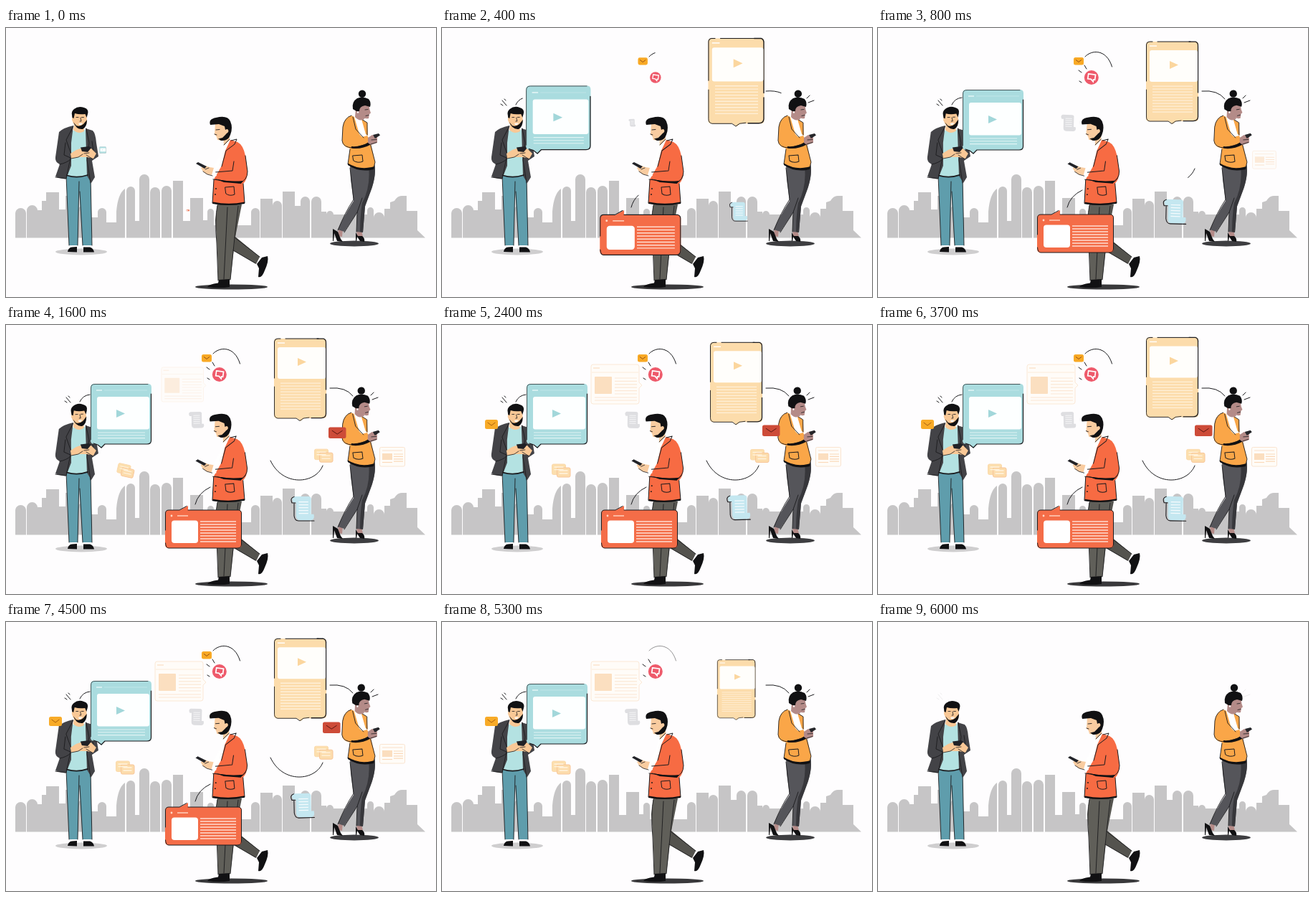
An HTML page for the animation above (6.1 s loop, 600 by 375 pixels).

```html
<!DOCTYPE html>
<html lang="en">
<head>
<meta charset="utf-8">
<title>Sharing on phones</title>
<style>
html, body { margin: 0; width: 100%; height: 100%; overflow: hidden; background: #fefdfe; }
svg { display: block; width: 100vw; height: 100vh; }
.ink { fill: none; stroke: #1b1b1e; stroke-linecap: round; stroke-linejoin: round; }
</style>
</head>
<body>
<svg id="stage" viewBox="0 0 600 375" xmlns="http://www.w3.org/2000/svg"></svg>
<script>
const LOOP = 6100, STEP = 100, INK = '#111113';
const stage = document.getElementById('stage');

const path = (d, fill, stroke = 'none') => `<path d="${d}" fill="${fill}" stroke="${stroke}"/>`;
const ink = (d, w = 1) => `<path class="ink" d="${d}" stroke-width="${w}"/>`;
const rect = (x, y, w, h, fill, r = 0, stroke = 'none') =>
  `<rect x="${x}" y="${y}" width="${w}" height="${h}" rx="${r}" fill="${fill}" stroke="${stroke}"/>`;
const oval = (x, y, rx, ry, fill) => `<ellipse cx="${x}" cy="${y}" rx="${rx}" ry="${ry}" fill="${fill}"/>`;
const group = (id, body) => `<g id="${id}">${body}</g>`;
function lines(x, y, w, n, gap, color, sw = 1.3) {
  let d = '';
  for (let i = 0; i < n; i++) d += `M${x} ${y + i * gap}h${w}`;
  return `<path d="${d}" stroke="${color}" stroke-width="${sw}"/>`;
}

// Skyline: [left, width, top, rounded]
const towers = [
  [13, 15, 251, 1], [29, 15, 247, 1], [44, 6, 254, 0], [50, 6, 241, 0], [56, 18, 229, 0],
  [74, 9, 253, 0], [83, 7, 234, 0], [90, 11, 263, 0], [101, 14, 247, 1], [116, 12, 264, 0],
  [128, 12, 251, 1], [140, 14, 271, 0], [168, 12, 221, 1], [180, 6, 269, 0], [186, 14, 204, 1],
  [201, 14, 222, 1], [217, 14, 220, 1], [233, 14, 213, 0], [247, 10, 269, 0], [257, 18, 237, 0],
  [275, 6, 268, 0], [281, 9, 252, 1], [290, 52, 275, 0], [342, 12, 251, 1], [355, 17, 238, 0],
  [372, 13, 241, 1], [386, 17, 228, 0], [403, 8, 248, 0], [411, 13, 235, 1], [426, 14, 235, 1],
  [440, 7, 256, 0], [447, 10, 255, 1], [457, 47, 260, 0], [504, 9, 250, 1], [513, 15, 257, 1],
  [528, 8, 252, 0]
];
function city() {
  let d = '';
  for (const [x, w, y, round] of towers) {
    const r = w / 2;
    d += round ? `M${x} 292.5V${y + r}a${r} ${r} 0 0 1 ${w} 0V292.5z` : `M${x} 292.5V${y}h${w}V292.5z`;
  }
  d += 'M154 292.5V256Q156 231 166 224V292.5z';
  d += 'M536 292.5V243Q539 242 542 241Q546 234 552 234H559V255H574V282L585 292.5z';
  return path(d, '#c6c5c6');
}

function casualMan() {
  const dark = '#434347', skin = '#f9c896', teal = '#5f9dac';
  const legs =
    oval(105, 312, 36, 4.4, '#cfcecf') +
    path('M84 204H118L120 303H107L102 226L100 303H88z', teal) +
    ink('M84 206L88 303M102 214L100 303M118 207L120 303M107 303L103 228', .9) +
    path('M86 312Q87 306 92 305.5L99 305L99 312.5zM108 312.5V305.5L117 305.5Q122 307 123 312.5z', INK);
  const torso =
    path('M92 143L112 142L115 205Q99 210 84 206z', '#b4e2e2') +
    path('M94 136Q80 139 74 145L69 180Q68 187 75 190L69 207Q77 211 84 210L91 192L91 160z', dark) +
    path('M111 140L121 143Q125 147 126 160L129 179L120 185L124 208L119 216L113 206L112 172z', dark) +
    ink('M94 137L84 156L91 176L84 210L69 208M75 190Q85 188 90 183M83 160L81 177L90 181M112 140L116 160L113 184L118 216M120 158L123 179', .9) +
    ink('M85 205.5Q99 210 114 205', 1.8) +
    path('M90 175L98 170L107 167L119 168L126 175L122 182L113 180L102 180L91 182z', skin) +
    path('M104 166.5L116 165L119 167L114 173L106 172z', '#202126') +
    ink('M91 182L101 180L107 176M112 177L120 182M109 175L116 174', .8);
  const head =
    path('M96 131L108 133L109 144Q101 149 94 142z', skin) +
    path('M93 119Q101 115 112 119L113 129Q112 139 105 140Q95 139 92 128z', skin) +
    path('M94 131L98 136Q103 138 108 134L113 128Q113 138 107 141Q98 142 94 131z', INK) +
    path('M92 121Q91 116 95 113Q101 108 109 111Q116 113 114 120L112.5 125L110.5 120Q102 121 96 119L94.5 126L92.5 125z', INK) +
    path('M101 133L107 132.5L105 135L102.5 135z', '#fff') +
    ink('M98 124.5h3M105.5 124.5h3M104 125L105 130L103 130', .8);
  return legs + group('casualTop', torso + group('casualHead', head));
}

function walker() {
  const red = '#f76b43', skin = '#f9cca0', gray = '#605f59';
  const legs =
    oval(314.5, 361, 50.5, 3.6, '#39393b') +
    path('M312 246H329L320 291L354 319L349 329L315 309z', '#54534e') +
    path('M295 246H326L320 290L313 351L296 352Q295 300 292 268z', gray) +
    ink('M295 247Q291 267 294 300L296 352M309 250L304 350M324 248L319 292L313 351M319 292L354 319M317 310L348 328', .9) +
    path('M281 361Q283 357 296 355.5L297 351L312 350L312 361Q298 363.5 281 361z', INK) +
    path('M350 329L357 320L365 318Q367 325 361 338Q357 349 352 347L353 335z', INK);
  const top =
    path('M304 157L313 156L309 171L294 206L291 191L299 177z', '#fff') +
    path('M313 156L323 159Q331 163 334 178L337 200Q337 211 331 217L333 244Q309 249 288 244L290 211L301 192L306 171z', red) +
    ink('M314 157L322 155L319 162L307 171L301 193M290 212L288 244Q310 249 333 244L331 217M334 178L337 200Q337 212 326 216L289 211M318 186L316 199L292 201', 1) +
    path('M291 210Q310 215 331 213L328 217L304 215z', INK) +
    path('M289 242.5Q311 247 333 242.5V245Q310 249 288 245z', INK) +
    ink('M306 222L318 221L319 232Q312 235 307 231z') +
    oval(293, 224, .9, .9, INK) + oval(292, 232, .9, .9, INK) +
    path('M287 204L290 194L294 206L288 208z', '#fff') +
    path('M272 195L278 192L284 194L290 195L287 205L280 204L275 200z', skin) +
    path('M265 189L268 187L280 193L277 196z', '#222328') +
    ink('M275 200L281 204L288 206M283 195L278 197', .8);
  const head =
    path('M303 150L312 147L312 156L304 164z', skin) +
    path('M292 133L309 133L312 149L302 157L295 156L294 152L291 148z', skin) +
    path('M285 135Q282 127 293 125Q309 121 313 130Q317 139 313 149Q310 158 300 157L296 154.5L302 153L307 148L310 143L306 142L305 137L297 134z', INK) +
    path('M306 142Q310 139 310.5 144Q309 148 306 147z', skin) +
    ink('M293 142L298 141.5M291 148L294 149M304 163L312 155', .9);
  return legs + group('walkTop', top + group('walkHead', head));
}

function woman() {
  const gold = '#faa648', skin = '#b48b88', gray = '#55555a';
  const legs =
    oval(486, 300.5, 34, 3.9, '#3e3e41') +
    path('M464 280L470 280L469 291L463 290zM489 280L496 281L498 291L490 291z', skin) +
    path('M480 190L514 188Q517 202 511 222L501 249L498 285L489 284L490 257L472 284L463 281Q473 259 485 241L481 211z', gray) +
    path('M506 193L514 190Q517 204 510 224L501 248L498 285L494 284Q494 262 497 244Q509 222 506 193z', '#37373b') +
    ink('M480 195L485 239Q473 257 463 282M489 284L490 257L472 285M490 257L497 237', .9) +
    path('M456 280L463 284L467 294L470 298L462 297L458 286L457 297L456 297zM488 285L491 290L497 290Q501 293 500 298L494 297L490 291L489 297L488 297z', INK);
  const top =
    path('M485 123L497 126L504 149L495 154z', '#fff') +
    path('M482 122Q472 125 470 137L469 157Q469 165 480 168L477 190Q493 202 513 195L515 187L508 157L504 150L497 152L493 148L486 124z', gold) +
    path('M496 127L504 132L505 150L502 148z', gold) +
    ink('M482 122Q472 125 470 138L469 157Q470 167 485 167L510 160M480 169L477 190Q493 201 513 196M484 124L488 141L499 153M496 127L504 132L504 149M508 160L515 187L513 195', .9) +
    path('M482 165Q496 166 506 159L510 162Q495 170 482 167.5z', INK) +
    path('M477 188.5Q494 199 514 193L513 197Q493 202 477 191z', INK) +
    ink('M484 178L497 177L498 186Q491 189 485 185z') +
    path('M505 153L511 149L518 152L518 160L509 163L505 160z', skin) +
    path('M512 149L520 147L522 149.5L515 154z', '#25262a') + ink('M510 156L517 155.5M509 162L517 159.5', .8);
  const head =
    path('M488 112L499 118L500 127Q493 131 487 124z', skin) +
    path('M490 106L506 105L507.5 114L509 118.5L507 120L506 126Q499 128 491 119z', skin) +
    oval(497, 91.7, 5.2, 5.2, INK) +
    path('M484 113Q482 103 490 98Q498 95 506 99Q510 104 508 110L501 108Q493 109 493 116L489 116z', INK) +
    ink('M501 114L505 113.5M502 122.5L506 121.5', .8) + oval(491, 117.5, 1.1, 1.3, '#fff');
  return legs + group('womanTop', top + group('womanHead', head));
}

const bubble = () =>
  path('M123 82H198Q203 82 203 87V161Q203 166 198 166H138L133 172L128 166H123Q118 166 118 161V87Q118 82 123 82z', '#aadcdf') +
  ink('M118.5 160V88Q118.5 82.5 124 82.5H198', .7) + ink('M202.5 96V161Q202.5 166 197 166H138L133 171L128 167L122 165', 1.2) +
  lines(126, 91, 8, 1, 0, '#e9f8f8', 1.4) + lines(137, 91, 60, 1, 0, '#bfe6e8', 1) +
  rect(127, 100, 73, 45.5, '#fdffff', 3) + path('M154 118L166 123.6L154 129z', '#a2d7da') +
  lines(128, 150, 66, 3, 3.8, '#e0f4f4', 1.1);

const post = () =>
  path('M227 258H243L254 252V258H324Q329 258 329 263V306Q329 311 324 311H227Q222 311 222 306V263Q222 258 227 258z', '#f46d48') +
  ink('M222.5 286V263Q222.5 258 227 258H242L252 252.5M254 258H325Q329 259 328.5 264V306Q328 311 323 311H227Q223 311 222.5 304', 1) +
  oval(231, 266, 1.4, 1.4, '#ffd9c8') + lines(239, 266, 15, 1, 0, '#ffd0bc', 1.5) +
  rect(231, 272.5, 37, 31.5, '#fff', 4) + lines(271, 274, 50, 8, 4, '#ffdccf', 1.4);

const video = () =>
  path('M378 19H443Q447 19 447 23V126Q447 130 443 130H416L411 134L406 130H378Q374 130 374 126V23Q374 19 378 19z', '#fcdcab') +
  ink('M374.5 74V23Q375 19 379 19H383M390 19H436', 1) + ink('M374.5 86V124Q374.5 129 379 130H405L410 133.5L415 130L423 129', .9) +
  ink('M434 19H443Q447 20 446.5 26V90M446.5 96V124Q446 129.5 440 129.5H426', 1.3) +
  lines(379, 25, 10, 1, 0, '#fff', 1.4) + rect(379, 31, 67, 44, '#fffefb', 3) +
  path('M407 46L419 51.5L407 57z', '#fbd69e') + lines(383, 81, 56, 10, 4, '#fff0d8', 1.3);

const article = () =>
  path('M211 55H272Q275 55 275 58V80L279 84L275 88V107Q275 110 272 110H211Q208 110 208 107V58Q208 55 211 55z', '#fffcf8', '#fbe8d6') +
  lines(209, 66, 65, 1, 0, '#fcebda', 1) + rect(213, 72, 24, 24, '#fbdfc0', 1) +
  lines(241, 74, 31, 6, 4.4, '#fce8d5', 1.2) + lines(213, 101, 59, 2, 4, '#fce8d5', 1.2) +
  lines(211, 60, 9, 1, 0, '#fce3cb', 1.4);

const note = () =>
  rect(521.5, 170.5, 35, 26.5, '#fffcf8', 2, '#fae4d0') +
  lines(525, 175, 28, 1, 0, '#fbe6d2', 1.2) + rect(525, 179, 14, 9, '#fbdebf') +
  lines(541, 180, 13, 4, 3.4, '#fad9ba', 1.2) + lines(525, 191.5, 14, 1, 0, '#fad9ba', 1.2);

const pair = (x, y) => `<g transform="translate(${x} ${y})">` +
  rect(0, 0, 19, 14.5, '#fcdfae', 2, '#fbd9ac') + rect(7, 5, 18.5, 13, '#fcdcac', 2, '#f8c598') +
  lines(3, 4, 13, 2, 3.6, '#fff3df') + lines(10, 9, 12, 2, 4, '#fff3df') + '</g>';

const scroll = (x, y, s, fill, line) => `<g transform="translate(${x} ${y}) scale(${s})">` +
  path('M4 0H24Q29 0 28 6V26H32Q34 34 28 35H12Q6 35 6 28V9H2Q-2 2 4 0z', fill) +
  lines(10, 8, 14, 5, 4.2, line, 1.3) + '</g>';

const mail = (x, y, w, h, fill, flap) => rect(x, y, w, h, fill, 2.5) +
  ink(`M${x + w * .2} ${y + h * .3}L${x + w / 2} ${y + h * .62}L${x + w * .8} ${y + h * .3}`).replace('class="ink"', `fill="none" stroke="${flap}"`);

const chat = () => oval(297.8, 69, 10, 10, '#ee5a6b') +
  '<path d="M293 64.5H303V71.5H301V74.5L297.5 71.5H293z" transform="rotate(8 298 69)" fill="none" stroke="#fff" stroke-width="1.7"/>';

// Strokes that draw themselves: [path, in, duration, out]
const strokes = [
  ['M442 196C432 222 386 226 369 189', 700, 380, 4700],
  ['M289 40C298 30 319 29 326.5 54', 300, 350, 5080],
  ['M452 88Q474 86 484 99', 200, 350, 5550],
  ['M103 107Q107 98 117 97', 200, 300, 5550],
  ['M264 250Q268 234 285 226', 200, 350, 4800],
  ['M90 108L84 101M89 101L87 99M85 108L82 106', 250, 200, 5650],
  ['M509 98L513 94M511 104L519 101', 250, 200, 5650],
  ['M288 52L291 57M281 74L284 76M280 59L284 62', 400, 200, 5350]
];

// Popping items: id, drawing, pivot, in, duration, out, float(t) -> [dx, dy, angle], fade
const wave = (t, period, shift = 0) => Math.sin(2 * Math.PI * (t - shift) / period);
const still = () => [0, 0];
const items = [
  ['post', post(), 253, 251, -5, 560, 4800, t => [0, 2 * settle(t)]],
  ['article', article(), 279, 86, 1150, 900, 5350, still, 1],
  ['bubble', bubble(), 132, 171, -15, 600, 5380, t => [0, 4 * settle(t)]],
  ['video', video(), 411, 134, 40, 600, 5108, t => [0, 1.8 - 3.5 * Math.cos(2 * Math.PI * (t - 1200) / 2400)]],
  ['note', note(), 539, 184, 500, 500, 4750, still, 1],
  ['pairR', pair(430.5, 173.5), 443, 182, 1150, 450, 4700, t => [0, .4 * wave(t, 2400)]],
  ['pairL', pair(153.5, 194), 168, 206, 1430, 500, 5380, t => [0, 0, 14 * (1 - ramp(t, 1500, 500))]],
  ['grayScroll', scroll(255, 121, .65, '#dedee1', '#fafafb'), 265, 132, 350, 400, 5350, t => [0, 0, 1.5 * wave(t, 1700, 500)]],
  ['blueScroll', scroll(399, 239, .95, '#c4e7f0', '#f6fbfd') +
    ink('M404 248H399Q396 241 402 239.5M402 249V266Q403 273 408 273H430', 1.1),
    413, 256, 300, 400, 4650, t => [0, -1.5 * ramp(t, 1700, 700) + 1.5 * ramp(t, 2500, 1000), -1.5 * wave(t, 2400, 1600)]],
  ['mailTop', mail(273, 41, 14, 10.5, '#f8a925', '#985015'), 285, 50, 250, 400, 4900, still],
  ['chat', chat(), 298, 69, 300, 400, 5350, still],
  ['mailL', mail(60, 132, 18, 13, '#f8ab28', '#a96010'), 69, 139, 1680, 400, 5600, still],
  ['mailR', mail(442, 139.5, 24.5, 15.5, '#cd4b38', '#5c1711'), 466, 148, 1100, 400, 4700,
    t => [8 - 3 * ramp(t, 1600, 800) - 5 * ramp(t, 2400, 1300), 3 * (1 - ramp(t, 1600, 700))]]
];

stage.innerHTML = city() + casualMan() + walker() + woman() +
  strokes.map(([d], i) => `<path id="line${i}" class="ink" pathLength="1" d="${d}"/>`).join('') +
  items.map(([id, body]) => group(id, body)).join('');
const $ = id => document.getElementById(id);

const clamp = p => Math.max(0, Math.min(1, p));
function ramp(t, start, length) {
  const p = clamp((t - start) / length);
  return p * p * (3 - 2 * p);
}
const settle = t => 1 - ramp(t, 800, 650) + ramp(t, 4650, 600);
const backOut = p => 1 + 2.4 * (p - 1) ** 3 + 1.4 * (p - 1) ** 2;

function drawItem([id, , x, y, start, length, out, float, fade], t) {
  const p = clamp((t - start) / length), q = clamp((t - out) / 370);
  const grow = fade ? 1 - (1 - p) ** 3 : backOut(p);
  const size = q ? 1 - q * q : grow;
  const [dx, dy, angle = 0] = float(t);
  const el = $(id);
  el.style.display = t < start || size < .01 ? 'none' : '';
  el.setAttribute('transform',
    `translate(${x + dx} ${y + dy}) rotate(${angle}) scale(${Math.max(0, size)}) translate(${-x} ${-y})`);
  if (fade) el.setAttribute('opacity', p * (1 - q));
}

function drawLine([, start, length, out], i, t) {
  const p = ramp(t, start, length), q = ramp(t, out, 420), el = $('line' + i);
  el.style.display = p > 0 && q < 1 ? '' : 'none';
  el.style.strokeDasharray = p < 1 ? `${p} 2` : 'none';
  el.style.opacity = 1 - q;
}

function turn(id, angle, x, y) {
  $(id).setAttribute('transform', `rotate(${angle} ${x} ${y})`);
}

function render(t) {
  items.forEach(item => drawItem(item, t));
  strokes.forEach((s, i) => drawLine(s, i, t));
  const lean = ramp(t, 300, 500) - ramp(t, 4700, 600);
  turn('casualHead', -2.5 * (ramp(t, 200, 600) - ramp(t, 1700, 700)), 101, 141);
  turn('casualTop', -.2 * lean, 101, 205);
  turn('walkTop', -.5 * lean, 310, 246);
  turn('walkHead', 1.5 * lean, 309, 157);
  turn('womanTop', -.3 * lean, 496, 194);
  turn('womanHead', -1.2 * lean, 494, 126);
}

function tick() {
  render(Math.floor(performance.now() % LOOP / STEP) * STEP);
  requestAnimationFrame(tick);
}
tick();
</script>
</body>
</html>
```
